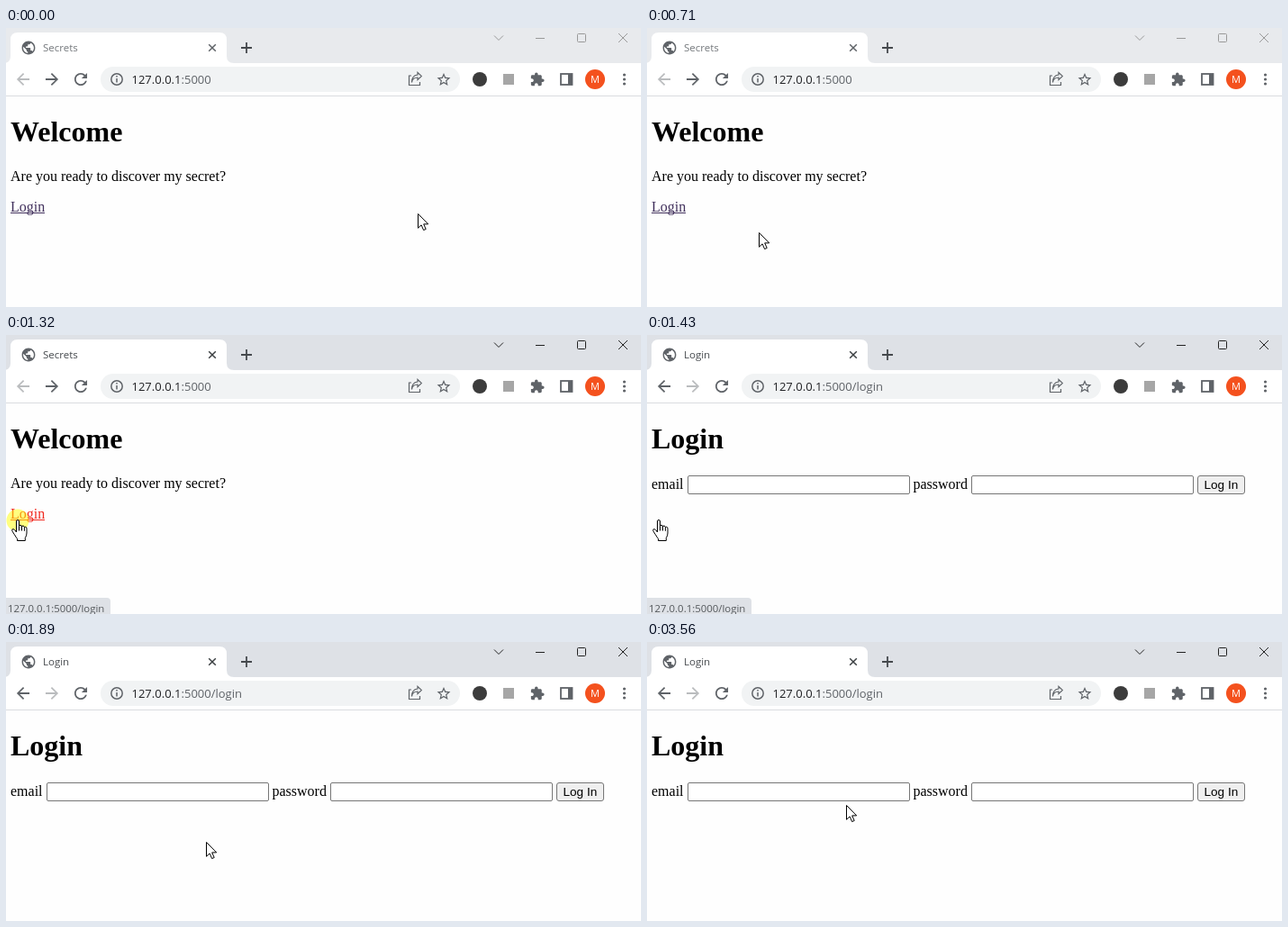
Animation of 705x310 px, one loop 5.18 s. Source, as an HTML page:

```html
<!DOCTYPE html>
<html lang="en">
<head>
<meta charset="utf-8">
<title>Login page</title>
<style>
  html, body { margin: 0; width: 100%; height: 100%; overflow: hidden; background: #fff; }
  svg { display: block; width: 705px; height: 310px; }
  .ui { font-family: "Open Sans", "Noto Sans", sans-serif; }
  .serif { font-family: "Liberation Serif", serif; font-size: 16px; }
  .h1 { font-size: 32px; font-weight: bold; }
  .line { fill: none; stroke: #5f6368; stroke-width: 1.5; }
  .icon { fill: #5f6368; }
  .caption { fill: none; stroke-width: 1; }
  .cursor { fill: #fff; stroke: #000; stroke-width: 1; stroke-linejoin: round; }
  .field { fill: #fff; stroke: #767676; }
</style>
</head>
<body>
<svg viewBox="0 0 705 310">
  <rect width="705" height="310" fill="#fefefe"/>

  <!-- tab strip -->
  <rect id="strip" width="705" height="39"/>
  <path d="M-3 39Q5 39 5 31V13Q5 5 13 5H237Q245 5 245 13V31Q245 39 253 39Z" fill="#fff"/>
  <path class="icon" transform="translate(25 22) scale(.74) translate(-12 -12)" d="M12 2C6.48 2 2 6.48 2 12s4.48 10 10 10 10-4.48 10-10S17.52 2 12 2zm-1 17.93c-3.95-.49-7-3.85-7-7.93 0-.62.08-1.21.21-1.79L9 15v1c0 1.1.9 2 2 2v1.93zm6.9-2.54c-.26-.81-1-1.39-1.9-1.39h-1v-3c0-.55-.45-1-1-1H8v-2h2c.55 0 1-.45 1-1V7h2c1.1 0 2-.9 2-2v-.41c2.93 1.19 5 4.06 5 7.41 0 2.08-.8 3.97-2.1 5.39z"/>
  <text id="tab" class="ui" x="41" y="26" font-size="11.5"></text>
  <path id="tabX" d="M225.2 18.2l7.6 7.6m0-7.6l-7.6 7.6" fill="none" stroke-width="1.5"/>
  <path d="M261 22h12m-6-6v12" fill="none" stroke="#45494d" stroke-width="1.8"/>
  <g id="caption" class="caption">
    <path d="M542 8.5l5 5 5-5M588 11.5h10M680 6l10 10m0-10l-10 10"/>
    <rect x="634.5" y="6.5" width="9" height="9" rx="1"/>
  </g>

  <!-- toolbar -->
  <rect y="39" width="705" height="36" fill="#fff"/>
  <rect y="75" width="705" height="1" fill="#dadce0"/>
  <path id="back" transform="translate(19 57) scale(.88) translate(-12 -12)" d="M20 11H7.83l5.59-5.59L12 4l-8 8 8 8 1.41-1.41L7.83 13H20v-2z"/>
  <path id="forward" transform="translate(51 57) scale(-.88 .88) translate(-12 -12)" d="M20 11H7.83l5.59-5.59L12 4l-8 8 8 8 1.41-1.41L7.83 13H20v-2z"/>
  <path class="icon" transform="translate(83 57) scale(.88) translate(-12 -12)" d="M17.65 6.35C16.2 4.9 14.21 4 12 4c-4.42 0-7.99 3.58-7.99 8s3.57 8 7.99 8c3.73 0 6.84-2.55 7.73-6h-2.08c-.82 2.33-3.04 4-5.65 4-3.31 0-6-2.69-6-6s2.69-6 6-6c1.66 0 3.14.69 4.22 1.78L13 11h7V4l-2.35 2.35z"/>
  <rect x="105" y="43" width="399" height="28" rx="14" fill="#f1f3f4"/>
  <circle class="line" cx="123" cy="57" r="6.2"/>
  <path class="line" d="M123 56v4.5M123 53v1.6"/>
  <text class="ui" x="139.5" y="62" font-size="13" fill="#202124">127.0.0.1<tspan id="path" fill="#5f6368"></tspan></text>
  <path class="line" style="stroke-width:1.2" d="M450 53h-2.5v10.5h12v-3.5M450.5 60.5C451 56.5 453.5 55 457 55v2.7l4.3-4.2-4.3-4.2v2.7C452.5 52.5 450.5 56 450.5 60.5Z"/>
  <path class="icon" transform="translate(486 57) scale(.74) translate(-12 -11.6)" d="M22 9.24l-7.19-.62L12 2 9.19 8.63 2 9.24l5.46 4.73L5.82 21 12 17.27 18.18 21l-1.63-7.03L22 9.24zM12 15.4l-3.76 2.27 1-4.28-3.32-2.88 4.38-.38L12 6.1l1.71 4.04 4.38.38-3.32 2.88 1 4.28L12 15.4z"/>
  <circle cx="526" cy="57" r="8" fill="#3c3c3c"/>
  <rect x="552" y="51" width="12" height="12" fill="#a6a6a6"/>
  <path class="icon" transform="translate(590 57) scale(.7) translate(-12.2 -11.8)" d="M20.5 11H19V7c0-1.1-.9-2-2-2h-4V3.5C13 2.12 11.88 1 10.5 1S8 2.12 8 3.5V5H4c-1.1 0-1.99.9-1.99 2v3.8H3.5c1.49 0 2.7 1.21 2.7 2.7s-1.21 2.7-2.7 2.7H2V20c0 1.1.9 2 2 2h3.8v-1.5c0-1.49 1.21-2.7 2.7-2.7 1.49 0 2.7 1.21 2.7 2.7V22H17c1.1 0 2-.9 2-2v-4h1.5c1.38 0 2.5-1.12 2.5-2.5S21.88 11 20.5 11z"/>
  <rect class="line" x="616" y="51" width="12.5" height="12" style="stroke-width:1.8"/>
  <rect class="icon" x="624" y="51" width="5" height="12"/>
  <circle cx="654" cy="57" r="11" fill="#f4511e"/>
  <text class="ui" x="654" y="61" font-size="11" text-anchor="middle" fill="#fff">M</text>
  <g class="icon">
    <circle cx="686.5" cy="52" r="1.6"/><circle cx="686.5" cy="57" r="1.6"/><circle cx="686.5" cy="62" r="1.6"/>
  </g>

  <!-- pages -->
  <g id="welcome" class="serif">
    <text class="h1" x="5" y="126" textLength="">Welcome</text>
    <text x="5" y="170">Are you ready to discover my secret?</text>
    <g id="link">
      <text x="5" y="204">Login</text>
      <rect x="5" y="205" width="38" height="1"/>
    </g>
    <circle id="press" cx="13" cy="206" r="12.5" fill="#ff0" opacity=".5"/>
  </g>
  <g id="login" class="serif">
    <text class="h1" x="5" y="126">Login</text>
    <text x="5" y="171">email</text>
    <rect class="field" x="45.5" y="156.5" width="246" height="20" rx="1.5"/>
    <text x="295.5" y="171">password</text>
    <rect class="field" x="360.5" y="156.5" width="246" height="20" rx="1.5"/>
    <rect x="611.5" y="156.5" width="52" height="20" rx="2.5" fill="#efefef" stroke="#767676"/>
    <text x="618.5" y="171" style="font:13.6px 'Liberation Sans',sans-serif">Log In</text>
  </g>

  <g id="status">
    <path d="M0 292H112Q116 292 116 296V310H0Z" fill="#dee1e6"/>
    <text class="ui" x="2" y="308" font-size="11.4" fill="#54585c">127.0.0.1:5000/login</text>
  </g>

  <path id="arrow" class="cursor" d="M.5 .5V16.3L4.1 12.9 6.6 18.6 9.2 17.5 6.7 11.9H11.7Z"/>
  <path id="hand" class="cursor" transform="translate(6 205)" d="M5.5 14V2Q5.5 .5 7 .5T8.5 2V7.5Q8.7 6.3 10 6.3 11.5 6.3 11.5 8 11.8 6.9 13 7 14.3 7.2 14.4 8.8 14.8 8 15.8 8.2 17 8.5 17 10.2V15Q17 18 15.3 20.5V23.5H6.5V21.5Q5 19.5 3 16.2L.8 12.7Q.4 10.6 2 10.6 3.5 10.8 5.5 14ZM8.5 7.5V12.5M11.5 8V12.5M14.4 8.8V12.8"/>
</svg>
<script>
const LOOP = 5180, TICK = 51, START = 350;
const FOCUS = 1320, RELEASE = 1380, LOAD = 1430;
const $ = id => document.getElementById(id);
const set = (id, name, value) => $(id).setAttribute(name, value);
const show = (id, on) => set(id, "visibility", on ? "visible" : "hidden");
const clamp = v => Math.min(1, Math.max(0, v));
const ramp = (t, from, to) => clamp((t - from) / (to - from));

// pointer path: time, x, y
const track = [
  [299, 457, 206], [401, 412, 209], [554, 270, 219], [707, 124, 227],
  [809, 40, 229], [860, 14, 229], [1472, 14, 206], [1523, 30, 209],
  [1574, 74, 216], [1625, 130, 220], [1676, 180, 222], [1727, 222, 222],
  [1982, 222, 222], [2084, 222, 204], [2186, 221, 181]
];

function pointer(t) {
  if (t >= 3560) return [220, 181];
  const i = track.findIndex(p => p[0] > t);
  if (i === 0) return track[0].slice(1);
  if (i < 0) return track[track.length - 1].slice(1);
  const a = track[i - 1], b = track[i], k = ramp(t, a[0], b[0]);
  return [1, 2].map(n => Math.round(a[n] + (b[n] - a[n]) * k));
}

function draw(t) {
  // the screen refreshes in coarse ticks
  const q = t < START ? 0 : START + Math.floor((t - START) / TICK) * TICK;
  const active = t >= FOCUS, loaded = t >= LOAD;
  const pressed = active && t < RELEASE;
  const hover = t >= 920 && t < 1530;

  set("strip", "fill", active ? "#dee1e6" : "#e8eaed");
  set("tab", "fill", active ? "#45494d" : "#74787c");
  set("tabX", "stroke", active ? "#3c4043" : "#5f6368");
  set("caption", "stroke", active ? "#222" : "#999");
  $("tab").textContent = loaded ? "Login" : "Secrets";
  $("path").textContent = loaded ? ":5000/login" : ":5000";
  set("back", "fill", loaded ? "#5f6368" : "#babcbe");
  set("forward", "fill", loaded ? "#babcbe" : "#5f6368");

  show("welcome", !loaded);
  show("login", loaded);
  show("press", pressed);
  set("link", "fill", pressed ? "#f0281e" : "#41305c");
  set("status", "opacity", ramp(q, 1020, 1272) * (1 - ramp(q, 1630, 1880)));

  show("hand", hover);
  show("arrow", !hover);
  set("arrow", "transform", `translate(${pointer(q)})`);
}

const begin = performance.now();
function loop() {
  draw((performance.now() - begin) % LOOP);
  requestAnimationFrame(loop);
}
loop();
</script>
</body>
</html>
```
